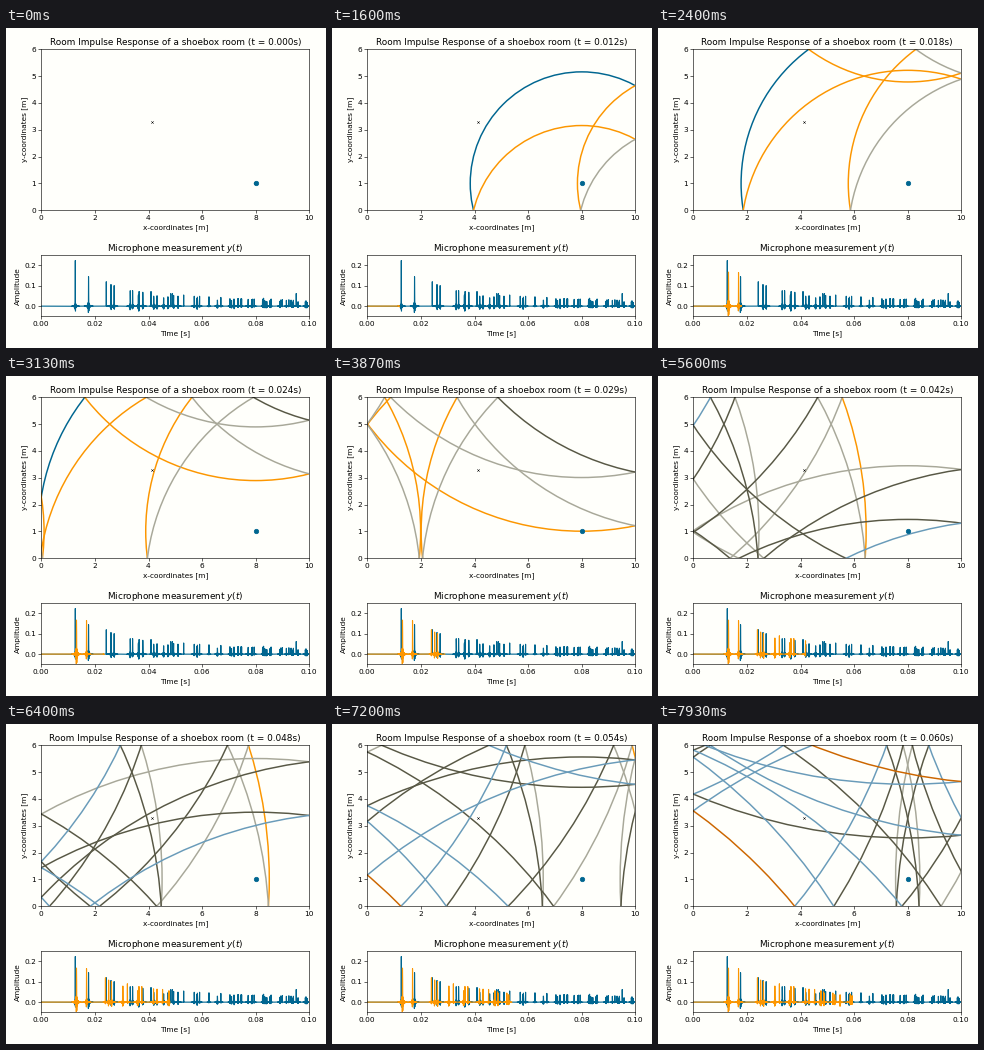
Write a matplotlib script that moves like this. It is 320x320 px and loops after 8000 ms.

```python
import numpy as np
import matplotlib.pyplot as plt
from matplotlib.animation import FuncAnimation
from matplotlib.patches import Circle

STATES = 120
SUB = 3              # animation frames per state
LOOP_MS = 8000
C = 343.0            # speed of sound
FS = 16000           # sampling rate
STEP = 8             # samples per state
LX, LY = 10, 6       # room size
SRC, MIC = (8, 1), (4.12, 3.3)
MEASURED_SRC, MEASURED_MIC = (8.014, 1.9825), (3.672, 2.2325)

PAPER = "#fffffb"
TEAL, ORANGE = "#006690", "#fc9600"
ORDER_COLORS = [TEAL, ORANGE, "#a8a899", "#585845", "#699bb9", "#cc6600"]


def mirrored(s, length, reach):
    """Mirror positions along one axis with their reflection count."""
    return [((1 - 2 * p) * s + 2 * m * length, abs(m - p) + abs(m))
            for m in range(-reach, reach + 1) for p in (0, 1)]


def images(src, reach_x, reach_y):
    found = [(x, y, a + b)
             for x, a in mirrored(src[0], LX, reach_x)
             for y, b in mirrored(src[1], LY, reach_y)]
    return sorted(found, key=lambda im: im[2])


def impulse_response(src, mic, n=1601, half=40):
    """Sum of windowed sinc pulses, one for each image source."""
    h = np.zeros(n)
    k = np.arange(n)
    for x, y, _ in images(src, 3, 4):
        d = np.hypot(x - mic[0], y - mic[1])
        u = k - d / C * FS
        window = np.where(np.abs(u) < half, 0.5 + 0.5 * np.cos(np.pi * u / half), 0)
        h += np.sinc(u) * window / d
    return h


def add_axes(left, top, width, height):
    return fig.add_axes([left / 320, 1 - (top + height) / 320,
                         width / 320, height / 320], facecolor=PAPER)


fig = plt.figure(figsize=(6, 6), dpi=320 / 6, facecolor=PAPER)

room = add_axes(35.3, 21.3, 268, 161)
room.set(xlim=(0, LX), ylim=(0, LY), xticks=range(0, 11, 2), yticks=range(7),
         xlabel="x-coordinates [m]", ylabel="y-coordinates [m]")
title = room.set_title("")
fronts = []
for x, y, order in images(SRC, 1, 2):
    color = ORDER_COLORS[min(order, len(ORDER_COLORS) - 1)]
    front = Circle((x, y), 0.01, fill=False, ec=color, lw=2)
    room.add_patch(front)
    fronts.append(front)
room.plot(*SRC, "o", color=TEAL, zorder=4)
room.plot(*MIC, "x", color="black", ms=3.5, mew=0.6, zorder=4)

scope = add_axes(35.3, 227.3, 268, 61)
scope.set(xlim=(0, 0.1), ylim=(-0.05, 0.25), yticks=[0, 0.1, 0.2],
          xlabel="Time [s]", ylabel="Amplitude")
scope.set_title("Microphone measurement $y(t)$")
times = np.arange(1601) / FS
scope.plot(times, impulse_response(MEASURED_SRC, MEASURED_MIC), color=TEAL, lw=1.5)
heard = impulse_response(SRC, MIC)
trace, = scope.plot([], [], color=ORANGE, lw=1.5)


def draw(i):
    # round to the nearest state so each one appears just ahead of its mark
    n = min((i + 1) // SUB, STATES - 1) * STEP
    t = (n + 2) / FS
    for front in fronts:
        front.set_radius(C * t)
    trace.set_data(times[:n], heard[:n])
    title.set_text(f"Room Impulse Response of a shoebox room (t = {t:.3f}s)")
    return [*fronts, trace, title]


anim = FuncAnimation(fig, draw, frames=STATES * SUB, interval=LOOP_MS / (STATES * SUB),
                     repeat=True, repeat_delay=0, blit=False)
plt.show()
```
